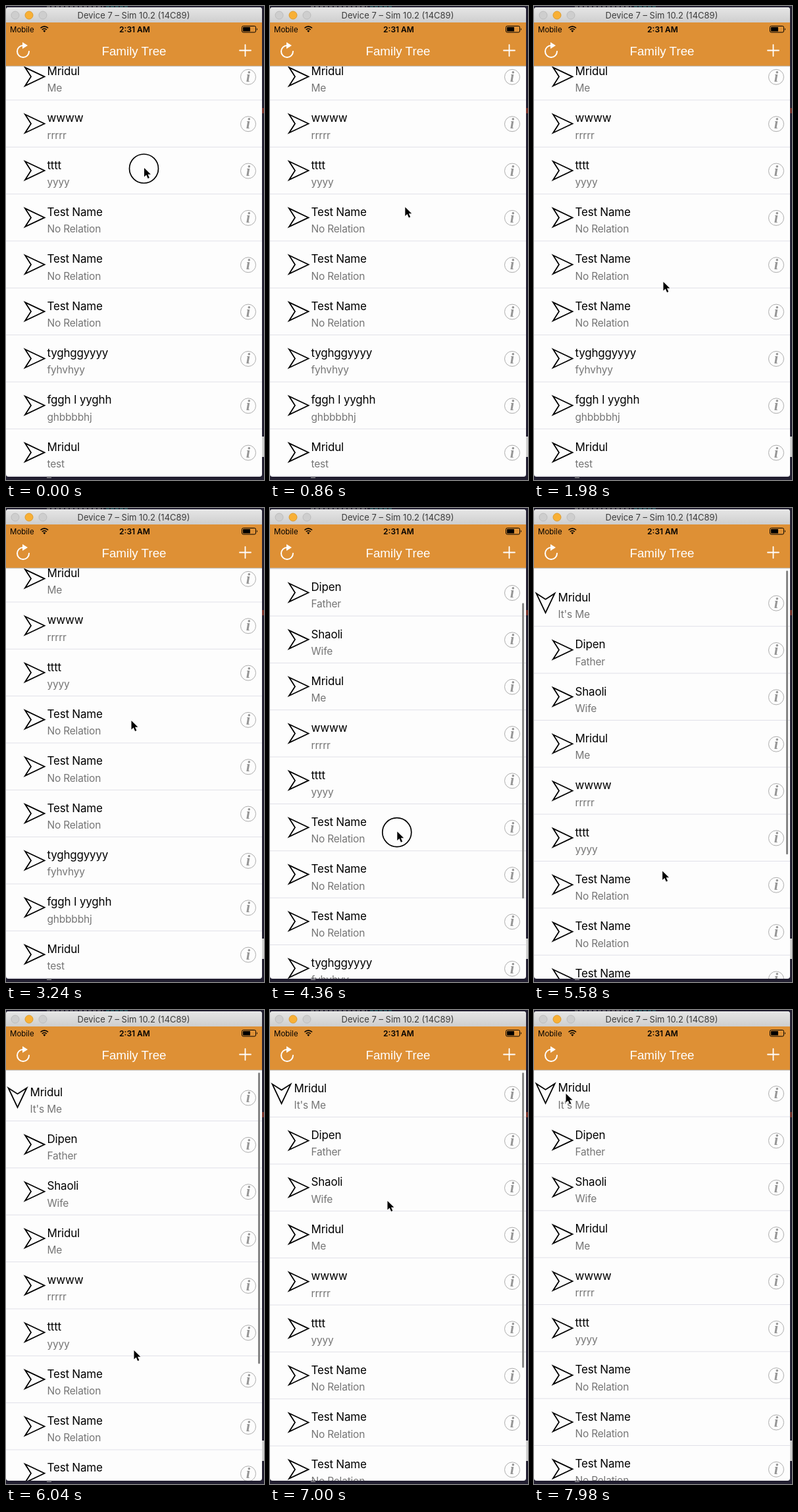
Animation, 392 px wide and 720 px high, one loop 8 s. Source, as an HTML page:

```html
<!DOCTYPE html>
<html lang="en">
<head>
<meta charset="utf-8">
<title>Family Tree</title>
<style>
  html, body { margin: 0; width: 100%; height: 100%; overflow: hidden; background: #211e30; }
  svg { display: block; width: 392px; height: 720px; font-family: Inter, "Open Sans", sans-serif; }
  .line { fill: none; stroke-linecap: round; }
  .name { font-size: 17px; letter-spacing: -.2px; }
  .relation { font-size: 15.5px; letter-spacing: -.2px; fill: #757575; }
  .info { font: italic bold 23px "Liberation Serif", serif; fill: #969696; text-anchor: middle; }
</style>
</head>
<body>
<svg viewBox="0 0 392 720">
  <defs>
    <linearGradient id="chrome" x2="0" y2="1">
      <stop stop-color="#e8e8e8"/><stop offset="1" stop-color="#cecece"/>
    </linearGradient>
    <clipPath id="window"><rect y="2" width="389" height="713" rx="4"/></clipPath>
    <clipPath id="screen"><rect y="91" width="389" height="624"/></clipPath>
  </defs>

  <rect width="392" height="720" fill="#211e30"/>
  <path d="M62 1h86" stroke="#9b9a9a" stroke-dasharray="5 2"/>
  <path d="M152 1h34" stroke="#3b8585" stroke-dasharray="5 2"/>
  <path d="M390.5 155v8" stroke="#9c3828" stroke-width="2"/>
  <path d="M390.5 654v31" stroke="#d0d0d0" stroke-width="3"/>
  <path d="M62 716.5h7" stroke="#aaa"/>

  <g clip-path="url(#window)">
    <rect width="389" height="720" fill="#fdfdfd"/>
    <g clip-path="url(#screen)">
      <g id="list"></g>
      <rect id="bar" x="383" width="3" rx="1.5" fill="#858585"/>
    </g>

    <rect width="389" height="25" fill="url(#chrome)"/>
    <circle cx="14" cy="14" r="6" fill="#cecece" stroke="#bcbcbc"/>
    <circle cx="35" cy="14" r="6" fill="#f8b036" stroke="#dd9b2d"/>
    <circle cx="56" cy="14" r="6" fill="#cecece" stroke="#bcbcbc"/>
    <text x="194" y="19" font-size="13" text-anchor="middle" fill="#3c3c3c">Device 7 – Sim 10.2 (14C89)</text>

    <rect y="25" width="389" height="66" fill="#de9035"/>
    <path d="M0 91.3h389" stroke="#bab2aa"/>
    <text x="6" y="40" font-size="11.5">Mobile</text>
    <g class="line" stroke="#000" stroke-width="1.7" style="stroke-linecap:butt">
      <path d="M52.5 33.5a8.2 8.2 0 0 1 11.5 0M54.8 36a5 5 0 0 1 7 0"/>
    </g>
    <path d="M58.3 40l-2-2.4a3 3 0 0 1 4 0z"/>
    <text x="195.5" y="40" font-size="12" font-weight="600" text-anchor="middle">2:31 AM</text>
    <rect x="358.5" y="30.5" width="21" height="9.5" rx="2" fill="none" stroke="#000"/>
    <rect x="360" y="32" width="11" height="6.5" rx=".5"/>
    <path d="M381 33.5q2 1.8 0 3.6z"/>

    <text x="194.5" y="75" font-size="18.8" text-anchor="middle" fill="#fff" style="font-family:'Liberation Sans',sans-serif">Family Tree</text>
    <g class="line" stroke="#fff" stroke-width="2">
      <path d="M26 60a9 9 0 1 0 9 9"/>
      <path d="M355 67.5h17M363.5 59v17" stroke-width="1.8"/>
    </g>
    <path d="M25 55l8 5l-8 5z" fill="#fff"/>
  </g>

  <g id="pointer">
    <circle id="press" cy="2" r="22" fill="none" stroke="#000" stroke-width="1.7"/>
    <path d="M.5 1v13.5l3.2-3l2.4 5.6l2.3-1l-2.4-5.4h4.4z" stroke="#fff" paint-order="stroke"/>
  </g>
</svg>

<script>
const LOOP = 8000, TOP = 91, ROW = 71.35, VIEW = 623;
const people = [
  ["Mridul", "It's Me"], ["Dipen", "Father"], ["Shaoli", "Wife"], ["Mridul", "Me"],
  ["wwww", "rrrrr"], ["tttt", "yyyy"],
  ["Test Name", "No Relation"], ["Test Name", "No Relation"], ["Test Name", "No Relation"],
  ["tyghggyyyy", "fyhvhyy"], ["fggh I yyghh", "ghbbbbhj"], ["Mridul", "test"]
];
const RANGE = people.length * ROW - VIEW;
const DRAG_START = 3420, EDGE = 4587, PEAK = 4920;
const [list, bar, pointer, press] =
  ["list", "bar", "pointer", "press"].map(id => document.getElementById(id));

list.innerHTML = people.map(([name, relation], i) => {
  const x = i ? 62.5 : 36.5;
  const arrow = i ? "translate(43.5 35.5)" : "translate(17.5 35.5) rotate(90)";
  return `<g transform="translate(0 ${TOP + i * ROW})">
    <path d="M-14.5-14L15 0L-14.5 14L-5.5 0Z" transform="${arrow}" fill="none" stroke="#000" stroke-width="1.8"/>
    <text class="name" x="${x}" y="33.2">${name}</text>
    <text class="relation" x="${x}" y="58.5">${relation}</text>
    <circle cx="368" cy="36" r="11.5" fill="none" stroke="#adadad"/>
    <text class="info" x="368" y="43">i</text>
    <path d="M0 ${ROW - .3}h389" stroke="#e0e0e8"/>
  </g>`;
}).join("");

const clamp = v => Math.max(0, Math.min(1, v));
const pull = t => clamp((t - DRAG_START) / (EDGE - DRAG_START)) ** 1.64;

// Scroll position; negative values are the overscroll of a critically damped bounce.
function scrollAt(t) {
  if (t < EDGE) return RANGE * (1 - pull(t));
  const s = 3 * (t - PEAK) / 1000;
  return -43 * (1 + s) * Math.exp(-s);
}

const path = [
  [0, 209.5, 245], [250, 209.5, 245], [1800, 196, 418], [2050, 196, 418],
  [3150, 190, 322], [DRAG_START, 190, 322], [EDGE, 194, 562], [PEAK, 195, 567],
  [5300, 195, 567], [6040, 194, 516], [7000, 178, 289], [7900, 48, 126], [LOOP, 48, 126]
];

function pointerAt(t) {
  const i = path.findIndex(p => p[0] > t);
  const [t0, x0, y0] = path[i - 1], [t1, x1, y1] = path[i];
  const u = clamp((t - t0) / (t1 - t0));
  const k = t0 === DRAG_START ? pull(t) : u * u * (3 - 2 * u);
  return [x0 + (x1 - x0) * k, y0 + (y1 - y0) * k];
}

function draw(t) {
  const scroll = scrollAt(t);
  list.setAttribute("transform", `translate(0 ${-scroll})`);
  bar.setAttribute("y", 95 + Math.max(0, scroll) * 166 / RANGE);
  bar.setAttribute("height", 449 + Math.min(0, scroll));
  bar.setAttribute("opacity", t < DRAG_START ? 0 : clamp((7600 - t) / 300));
  pointer.setAttribute("transform", `translate(${pointerAt(t)})`);
  const held = t > DRAG_START && t < EDGE;
  press.setAttribute("opacity", held || t < 150 ? 1 : 0);
}

const start = performance.now();
function frame() {
  draw((performance.now() - start) % LOOP);
  requestAnimationFrame(frame);
}
frame();
</script>
</body>
</html>
```
